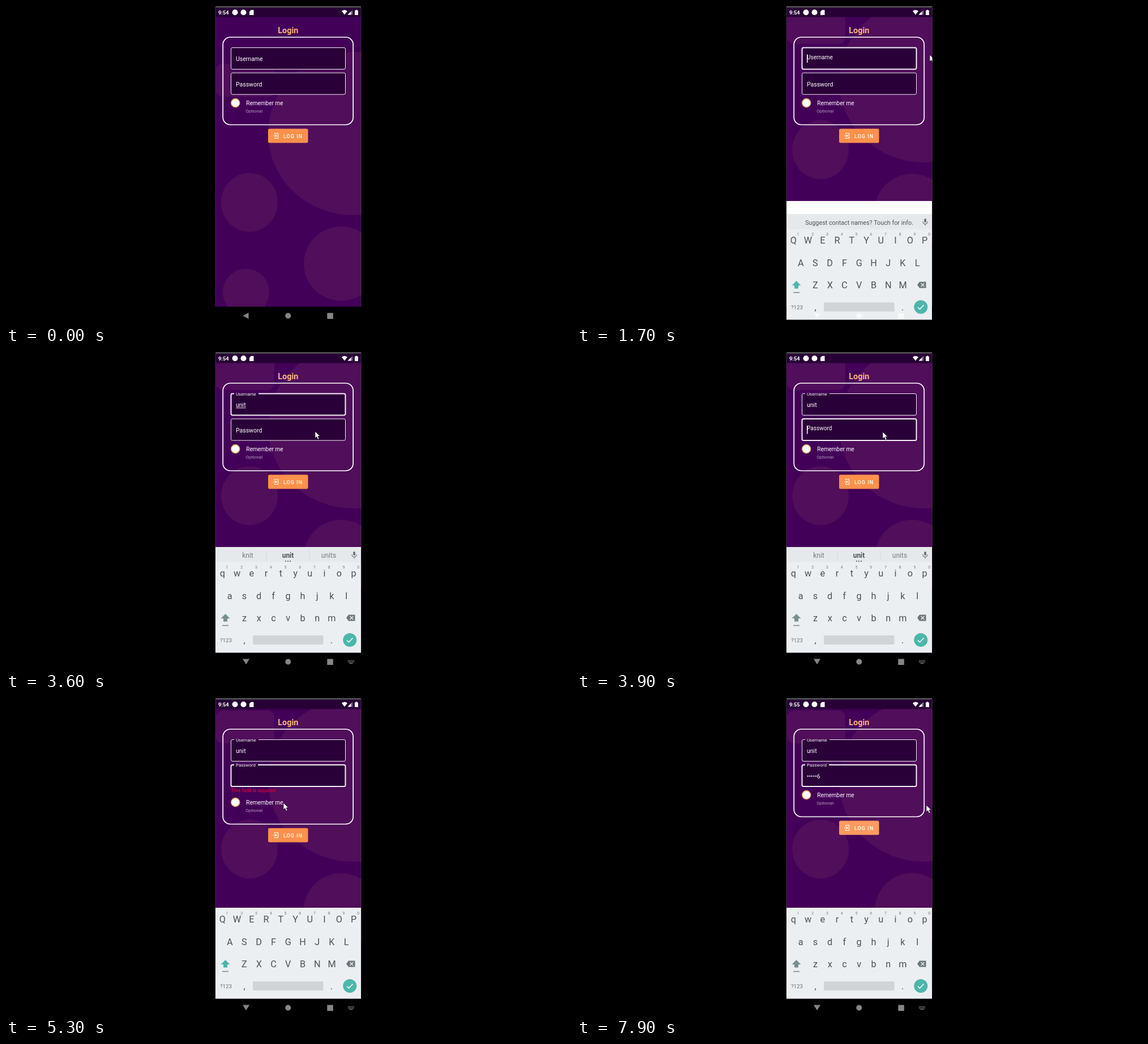
An HTML page for the animation above (8 s loop, 998 by 561 pixels).

```html
<!DOCTYPE html>
<html lang="en">
<head>
<meta charset="utf-8">
<title>Login</title>
<style>
  html, body { margin: 0; width: 100%; height: 100%; overflow: hidden; background: #000; }
  svg { display: block; width: 100vw; height: 100vh; font-family: Roboto, sans-serif; }
</style>
</head>
<body>
<svg id="stage" viewBox="0 0 998 561"></svg>
<script>
const LOOP = 8000, STEP = 100;
const FIELD = '#2a0038', TEAL = '#4db6ac', KEY = '#4b5357';
const stage = document.getElementById('stage');
const ruler = document.createElement('canvas').getContext('2d');
ruler.font = '10.5px Roboto, sans-serif';

const USER = 'unit', userTimes = [2600, 2700, 2900, 3000];
const PASS = '123456', passTimes = [5900, 6200, 6400, 6600, 6800, 7000];
const hints = [['i', 'you'], ['in', 'under'], ['until', 'unit'], ['knit', 'units']];
const FOCUS_USER = 1600, FOCUS_PASS = 3800, PASS_KEYS = 4000;

// Pointer stops: time, x, y
const pointer = [
  [0, 660, 110], [700, 645, 110], [1200, 575, 95], [1500, 575, 95], [1700, 623, 86],
  [1900, 660, 80], [3350, 660, 110], [3600, 546, 140], [3900, 540, 141],
  [4600, 528, 220], [4850, 520, 222], [5300, 490, 185], [5800, 477, 148],
  [7300, 477, 148], [7900, 617, 189], [8000, 630, 194]
];

const clamp = v => Math.min(1, Math.max(0, v));
const smooth = v => (v = clamp(v), v * v * (3 - 2 * v));
const mix = (a, b, p) => a + (b - a) * p;
const count = (times, t) => times.filter(s => s <= t).length;

const rect = (x, y, w, h, fill, extra = '') =>
  `<rect x="${x}" y="${y}" width="${w}" height="${h}" fill="${fill}" ${extra}/>`;
const ellipse = (x, y, rx, ry, fill, extra = '') =>
  `<ellipse cx="${x}" cy="${y}" rx="${rx}" ry="${ry}" fill="${fill}" ${extra}/>`;
const dot = (x, y, r, fill, extra) => ellipse(x, y, r, r, fill, extra);
const path = (d, fill, extra = '') => `<path d="${d}" fill="${fill}" ${extra}/>`;
const line = (d, stroke, width = 1) => path(d, 'none', `stroke="${stroke}" stroke-width="${width}"`);
const text = (x, y, size, fill, str, extra = '') =>
  `<text x="${x}" y="${y}" font-size="${size}" fill="${fill}" ${extra}>${str}</text>`;
const mid = 'text-anchor="middle"';
const group = (x, y, body) => `<g transform="translate(${x} ${y})">${body}</g>`;

function backdrop(shift) {
  const tone = '#500e5b';
  return rect(370, 0, 257, 531, '#430058') + group(0, shift,
    rect(371, 102, 103, 58, tone, 'rx="12"') +
    ellipse(613, 225, 150, 144, tone) +
    ellipse(430, 346.5, 50, 52, tone) +
    ellipse(592, 454.5, 66, 65.5, tone) +
    dot(424, 504.5, 41, tone));
}

function statusBar(clock) {
  return rect(370, 0, 257, 3, '#4a484b') + rect(370, 3, 257, 16.5, '#270036') +
    text(375, 15, 9.3, '#fff', clock, 'font-weight="700"') +
    dot(404.5, 11.3, 5, '#fff') + dot(419.5, 11.3, 5, '#fff') +
    path('M433 7h4.500v9h-7.500v-6z', '#fff') +
    path('M593 9q5-4 10 0l-5 6.500z', '#fff') +
    path('M603.500 15.500l8.500-8.500v8.500z', '#8d7896') + path('M603.500 15.500l5.500-5.500v5.500z', '#fff') +
    path('M616 8h1.500v-1.200h3v1.200h1.500v8h-6z', '#fff');
}

function field(y, name, { focus, float, value = '', underline, caret }) {
  const w = focus ? 2 : 1, gap = float > 0.5 ? (name === 'Username' ? 446 : 445) : 403;
  const width = ruler.measureText(value).width, base = y + 23.5;
  let out = rect(397.5, y, 202, 38, FIELD, 'rx="2.500"') +
    line(`M${gap} ${y}H597a2.500 2.500 0 0 1 2.500 2.500v33a2.500 2.500 0 0 1-2.500 2.500H400a2.500 2.500 0 0 1-2.500-2.500v-33a2.500 2.500 0 0 1 2.500-2.500h3`, '#f4eef6', w) +
    text(406, mix(base, y + 3, float), mix(10.5, 7.9, float), '#fff', name) +
    text(406, base, 10.5, '#fff', value);
  if (underline) out += line(`M406 ${base + 1.7}h${width}`, '#fff', 0.9);
  if (caret) out += rect(406 + width + (width ? 0.3 : 0), y + 12, 1.5, 14.5, '#fff');
  return out;
}

function form(t) {
  const n = count(userTimes, t), m = count(passTimes, t);
  const onUser = t >= FOCUS_USER && t < FOCUS_PASS, onPass = t >= FOCUS_PASS;
  const marks = [FOCUS_USER, FOCUS_PASS, ...userTimes, ...passTimes].filter(s => s <= t);
  const blink = marks.length > 0 && (t - Math.max(...marks)) % 1000 < 500;
  const error = t >= 4900 && t < 5900, drop = error ? 13 : 0;
  const button = t >= 7800 ? '#ff9b5e' : '#ff914b';
  return text(498.3, 47.7, 14.4, '#ffb67c', 'Login', mid + ' font-weight="700"') +
    rect(383.2, 55, 230, 154.5 + drop, 'none', 'rx="13" stroke="#fff" stroke-width="1.700"') +
    field(73.5, 'Username', {
      focus: onUser, float: smooth((t - FOCUS_USER - 50) / 200),
      value: USER.slice(0, n), underline: onUser && n, caret: onUser && blink
    }) +
    field(118, 'Password', {
      focus: onPass, float: smooth((t - FOCUS_PASS - 50) / 200),
      value: m ? '•'.repeat(m - 1) + PASS[m - 1] : '', caret: onPass && blink
    }) +
    (error ? text(397.5, 166, 8.7, '#d3003c', 'This field is required', 'font-weight="500"') : '') +
    group(0, drop,
      dot(405.2, 171, 7.5, '#fff', 'stroke="#f5a45c" stroke-width="1.500"') +
      text(424.3, 174.8, 10, '#fff', 'Remember me') +
      text(423.3, 187.5, 8, '#b39bbb', 'Optional') +
      rect(463, 216.5, 70.5, 25, button, 'rx="2.500"') +
      line('M474.500 226.500v-2h6v9h-6v-2M472 229h6m-2-2l2 2l-2 2', '#fff', 1.1) +
      text(490, 232.7, 9, '#fff', 'LOG IN', 'font-weight="500" letter-spacing="1"'));
}

function suggestions(n) {
  const mic = rect(613.3, 352, 3.6, 7, '#667074', 'rx="1.800"') +
    line('M611 357q0 4.500 4 4.500t4-4.500M615 361.500v3', '#667074', 1.1);
  const bar = rect(370, 344, 257, 26.5, '#e6e9eb') + mic;
  if (!n) return bar + text(498.5, 362.7, 10.8, '#4b5357', 'Suggest contact names? Touch for info.', mid);
  const [left, right] = hints[n - 1];
  return bar + line('M460 351v16M536 351v16', '#d5d9db') +
    text(427, 363, 12, '#747c80', left, mid) +
    text(498, 363, 12, '#4b5357', USER.slice(0, n), mid + ' font-weight="700"') +
    text(570, 363, 12, '#747c80', right, mid) +
    [494, 498, 502].map(x => dot(x, 369, 1.1, '#4b5357')).join('');
}

function keyboard(t) {
  const secret = t >= PASS_KEYS;
  const typed = count(secret ? passTimes : userTimes, t);
  const row = (keys, x, y) => [...keys].map((k, i) =>
    text(x + 25.75 * i, y, 16.3, KEY, typed ? k : k.toUpperCase(), mid)).join('');
  const digits = [...'1234567890'].map((d, i) => text(390.5 + 25.75 * i, 382, 7, '#747c80', d, mid)).join('');
  return rect(370, secret ? 370 : 344, 257, secret ? 160.5 : 186.5, '#eceff1') +
    (secret ? '' : suggestions(typed)) +
    row('qwertyuiop', 382.3, 396) + digits +
    row('asdfghjkl', 395.2, 435.7) + row('zxcvbnm', 421, 475) +
    path('M387.500 462l8 8h-4.500v5.500h-7v-5.500h-4.500z', typed ? '#78908f' : TEAL) +
    line('M382 482.500h11', '#78868a', 1.3) +
    path('M601 469l4-5.500h11.500v11h-11.500z', '#6c777b') + line('M607.500 466l6 6m0-6l-6 6', '#eceff1', 1.4) +
    text(378, 511.7, 9.7, '#667074', '?123') +
    text(421, 513.5, 16, KEY, ',', mid) + text(575, 513.5, 16, KEY, '.', mid) +
    rect(436, 500, 124.5, 16, '#d0d4d7', 'rx="2"') +
    dot(607.3, 508, 12, TEAL) + line('M602 508.500l3.500 3.500l7-7.500', '#fff', 1.5);
}

function navIcons(open, sliding) {
  const ink = sliding ? '#f7f8f9' : '#858585';
  let out = path(open ? 'M418 541.500h12l-6 9.500z' : 'M418.500 546.500l10-5.500v11z', ink) +
    dot(498.3, 546.5, 5, ink) + rect(567.3, 541.5, 10.5, 10.5, ink);
  if (open && !sliding) {
    out += line('M604 544.500h11M604 547h11', ink, 1.3).replace('/>', ' stroke-dasharray="1.500 .8"/>') +
      line('M606.500 549.300h6', ink, 1.2);
  }
  return out;
}

function arrow(t) {
  const i = pointer.findIndex(p => p[0] > t);
  const [a, b] = [pointer[i - 1], pointer[i]];
  const p = smooth((t - a[0]) / (b[0] - a[0]));
  return group(mix(a[1], b[1], p), mix(a[2], b[2], p),
    path('M0 0v12l2.800-2.600l2 4.800l2.200-1l-2-4.600h3.800z', '#fff', 'stroke="#1a0622" stroke-width=".7"'));
}

function scene(t) {
  const open = t >= 1600, resized = t >= 1700;
  const slide = 23 * clamp((1800 - t) / 100) + 97 * clamp((1700 - t) / 100);
  const bottom = t >= PASS_KEYS ? 370 : resized ? 344 : 530;
  return '<defs><clipPath id="screen"><rect x="369.500" y="0" width="258" height="561"/></clipPath></defs>' +
    rect(0, 0, 998, 561, '#000') + '<g clip-path="url(#screen)">' +
    backdrop((bottom - 530) / 2) + statusBar(t >= 6300 ? '9:55' : '9:54') + form(t) +
    line('M369.900 3V530M627.200 3V530', '#66506e', 0.8) +
    (resized ? rect(370, bottom, 257, 530 - bottom, '#fff') : '') +
    rect(369, 530.5, 259, 31, '#000') +
    (open ? group(0, slide, keyboard(t)) : '') +
    navIcons(open, slide > 0 && open) + arrow(t) + '</g>';
}

let shown = -1;
const start = performance.now();
function frame(now) {
  const t = Math.floor((Math.max(0, now - start) % LOOP) / STEP) * STEP;
  if (t !== shown) stage.innerHTML = scene(shown = t);
  requestAnimationFrame(frame);
}
frame(start);
</script>
</body>
</html>
```
